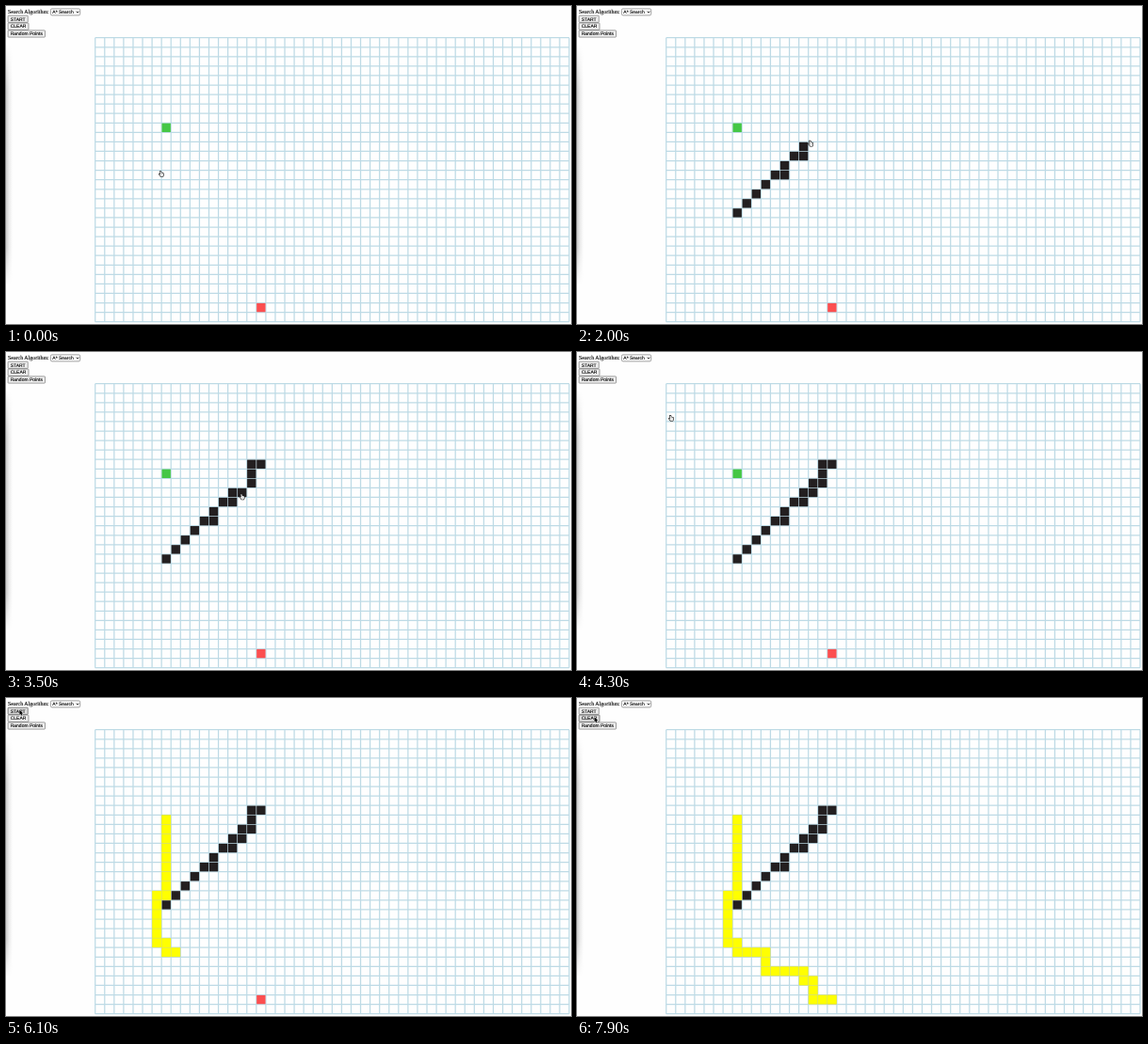
Write an HTML page with a canvas that moves like this. It is 600x338 px and loops after 8000 ms.

```html
<!DOCTYPE html>
<html lang="en">
<head>
<meta charset="utf-8">
<title>Path search on a grid</title>
<style>
html, body { margin: 0; width: 100%; height: 100%; overflow: hidden; background: #fff; }
canvas { display: block; width: 600px; height: 338px; }
</style>
</head>
<body>
<canvas id="stage"></canvas>
<script>
const W = 600, H = 338, LOOP = 8000;
const COLS = 50, ROWS = 30, LEFT = 94.7, TOP = 33.7, CELL = 10.066;
const SANS = '5px "Liberation Sans", Arial, sans-serif';
const SERIF = '5.95px "Liberation Serif", Times, serif';
const WALL = "#231f20";

const canvas = document.getElementById("stage");
const ctx = canvas.getContext("2d");
const dpr = window.devicePixelRatio || 1;
canvas.width = W * dpr;
canvas.height = H * dpr;
ctx.textRendering = "geometricPrecision";

// every cell along a chain of straight or diagonal runs
function walk(...corners) {
  const cells = [corners[0]];
  for (const [c, r] of corners.slice(1)) {
    let [x, y] = cells[cells.length - 1];
    while (x !== c || y !== r) {
      x += Math.sign(c - x);
      y += Math.sign(r - y);
      cells.push([x, y]);
    }
  }
  return cells;
}

// runs of cells that fill one after another between two times
const strokes = [
  { from: 1760, to: 1990, cells: walk([7, 18], [11, 14], [12, 14], [12, 13], [13, 12], [14, 12], [14, 11]) },
  { from: 2050, to: 2300, cells: walk([16, 10], [16, 8], [17, 8]) },
  { from: 3400, to: 3700, cells: walk([15, 11], [15, 10]) }
];
const route = {
  from: 5600, to: 6500,
  cells: walk([7, 9], [7, 17], [6, 17], [6, 22], [7, 22], [7, 23], [10, 23],
    [10, 25], [14, 25], [14, 26], [15, 26], [15, 28], [17, 28])
};

// pointer tip: time, x, y
const stops = [
  [0, 164.2, 175.2], [1100, 162.6, 223.2], [1750, 169, 220], [2000, 247.4, 143],
  [2300, 271, 118], [3500, 250, 150.7], [4050, 252, 141], [4400, 39, 38],
  [4900, 18, 20], [5200, 14.4, 12.6], [6600, 14.4, 12.6], [8000, 18.8, 20.8]
];

function pointerAt(t) {
  const i = Math.max(1, stops.findIndex(s => s[0] >= t));
  const [t0, x0, y0] = stops[i - 1], [t1, x1, y1] = stops[i];
  const k = (t - t0) / (t1 - t0);
  return [x0 + (x1 - x0) * k, y0 + (y1 - y0) * k];
}

function shown({ from, to, cells }, t) {
  if (t < from) return [];
  const steps = Math.max(1, cells.length - 1);
  return cells.slice(0, 1 + Math.floor((t - from) / (to - from) * steps));
}

function label(text, x, y, font) {
  ctx.font = font;
  ctx.fillStyle = "#000";
  ctx.fillText(text, x, y);
  ctx.strokeStyle = "#000";
  ctx.lineWidth = 0.12;
  ctx.strokeText(text, x, y);
}

function box(x, y, w, h, radius, fill, stroke) {
  ctx.beginPath();
  ctx.roundRect(x, y, w, h, radius);
  ctx.fillStyle = fill;
  ctx.fill();
  ctx.strokeStyle = stroke;
  ctx.lineWidth = 0.7;
  ctx.stroke();
}

function drawShadow() {
  for (let y = 40; y < 296; y++) {
    const fade = Math.min(1, (y - 40) / 50, (296 - y) / 40);
    const g = ctx.createLinearGradient(0, 0, 7, 0);
    g.addColorStop(0, `rgba(0,0,0,${0.2 * fade})`);
    g.addColorStop(0.5, `rgba(0,0,0,${0.07 * fade})`);
    g.addColorStop(1, "rgba(0,0,0,0)");
    ctx.fillStyle = g;
    ctx.fillRect(0, y, 7, 1);
  }
}

function drawControls([px, py]) {
  label("Search Algorithm:", 2, 8.2, SERIF);
  box(47.4, 2.9, 31.3, 7, 1.5, "#fff", "#777");
  label("A* Search", 49.3, 8.2, SANS);
  ctx.beginPath();
  ctx.moveTo(74.6, 5.7);
  ctx.lineTo(76, 7.2);
  ctx.lineTo(77.4, 5.7);
  ctx.strokeStyle = "#111";
  ctx.lineWidth = 0.9;
  ctx.stroke();
  ["START", "CLEAR", "Random Points"].forEach((text, i) => {
    ctx.font = SANS;
    const x = 2.1, y = 10.2 + 7.85 * i, w = ctx.measureText(text).width + 5.2;
    const hover = px > x && px < x + w && py > y && py < y + 7.6;
    box(x, y, w, 7.2, 0.6, hover ? "#dedede" : "#efefef", hover ? "#555" : "#767676");
    label(text, x + 2.6, y + 5.4, SANS);
  });
}

function drawGrid() {
  const w = COLS * CELL, h = ROWS * CELL;
  ctx.beginPath();
  for (let c = 0; c <= COLS; c++) {
    ctx.moveTo(LEFT + c * CELL, TOP);
    ctx.lineTo(LEFT + c * CELL, TOP + h);
  }
  for (let r = 0; r <= ROWS; r++) {
    ctx.moveTo(LEFT, TOP + r * CELL);
    ctx.lineTo(LEFT + w, TOP + r * CELL);
  }
  ctx.strokeStyle = "rgba(159,202,219,0.68)";
  ctx.lineWidth = 1.25;
  ctx.stroke();
}

function fillCell([c, r], color, gap = 0.35) {
  ctx.fillStyle = color;
  ctx.fillRect(LEFT + c * CELL + gap, TOP + r * CELL + gap, CELL - 2 * gap, CELL - 2 * gap);
}

function outline(points, fill, stroke, width) {
  ctx.beginPath();
  points.forEach(([x, y]) => ctx.lineTo(x, y));
  ctx.closePath();
  ctx.lineJoin = "round";
  ctx.strokeStyle = stroke;
  ctx.lineWidth = width;
  ctx.stroke();
  ctx.fillStyle = fill;
  ctx.fill();
}

function drawPointer([x, y]) {
  ctx.save();
  ctx.translate(x, y);
  if (x > LEFT && y > TOP) {
    outline([[-0.7, 0.5], [0.4, 0.5], [0.9, 2.2], [2.8, 2.5], [3, 4.6], [2.4, 6],
      [0.2, 6], [-1.6, 3.4], [-0.2, 3.6]], "#e4e4e4", "#1c1c1c", 1.2);
  } else {
    outline([[0, 0], [0, 5.4], [1.3, 4.3], [2.2, 6.2], [3, 5.8], [2.2, 4], [3.8, 3.8]],
      "#000", "#fff", 0.8);
  }
  ctx.restore();
}

function draw(t) {
  const pointer = pointerAt(t);
  ctx.setTransform(dpr, 0, 0, dpr, 0, 0);
  ctx.fillStyle = "#fefefe";
  ctx.fillRect(0, 0, W, H);
  drawShadow();
  drawControls(pointer);
  drawGrid();
  fillCell([7, 9], "#45c745");
  fillCell([17, 28], "#fc4f50");
  for (const stroke of strokes) {
    for (const cell of shown(stroke, t)) fillCell(cell, WALL);
  }
  for (const cell of shown(route, t)) {
    fillCell(cell, "#d5dc62", 0);
    fillCell(cell, "#ffff00", 0.3);
  }
  drawPointer(pointer);
}

const began = performance.now();
function tick() {
  draw((performance.now() - began) % LOOP);
  requestAnimationFrame(tick);
}
tick();
</script>
</body>
</html>
```
